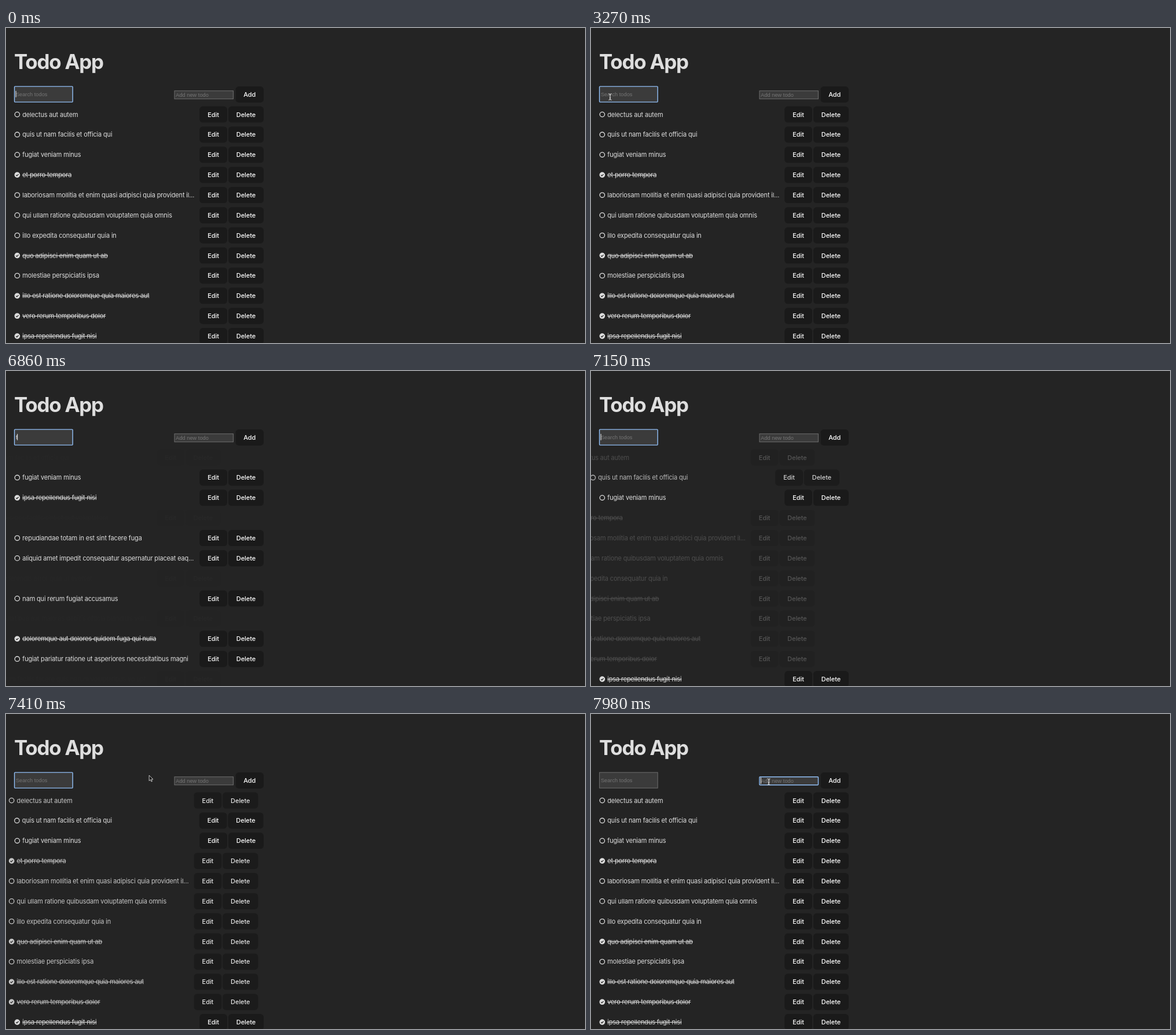
Animation of 1000 by 545 pixels, one loop 8000 ms. Source, as an HTML page:

```html
<!DOCTYPE html>
<html lang="en">
<head>
<meta charset="utf-8">
<title>Todo App</title>
<style>
html, body { margin: 0; width: 100%; height: 100%; overflow: hidden; background: #242424; }
svg { display: block; width: 100vw; height: 100vh; }
text { font-family: Inter, sans-serif; font-size: 11px; fill: #dedede; }
.title { font-size: 35px; font-weight: 700; letter-spacing: -1.3px; }
.item { letter-spacing: -.17px; }
.done { text-decoration: line-through; }
.label { font-weight: 500; letter-spacing: -.05px; text-anchor: middle; fill: #fff; }
.button { fill: #1a1a1a; }
.field { fill: #3b3b3b; }
.input { font-family: "Liberation Sans", Arial, sans-serif; font-size: 9.25px; }
.hint { fill: #757575; }
</style>
</head>
<body>
<svg id="stage" viewBox="0 0 1000 545"></svg>
<script>
const LOOP = 8000, ROWS = 12, PITCH = 34.86, ENTER = 630, SLIDE = 75;

// "+" marks a finished todo, "|" is where the title is cut off
const todos = `delectus aut autem
quis ut nam facilis et officia qui
fugiat veniam minus
+et porro tempora
laboriosam mollitia et enim quasi adipisci quia provident il|lum
qui ullam ratione quibusdam voluptatem quia omnis
illo expedita consequatur quia in
+quo adipisci enim quam ut ab
molestiae perspiciatis ipsa
+illo est ratione doloremque quia maiores aut
+vero rerum temporibus dolor
+ipsa repellendus fugit nisi
+accusamus eos facilis sint et aut voluptatem
repudiandae totam in est sint facere fuga
aliquid amet impedit consequatur aspernatur placeat eaq|ue fugiat suscipit
rerum perferendis error quia ut eveniet
nam qui rerum fugiat accusamus
ut necessitatibus aut maiores debitis officia blanditiis velit| et
+doloremque aut dolores quidem fuga qui nulla
fugiat pariatur ratione ut asperiores necessitatibus magni
praesentium facilis facere quis harum voluptatibus volupt|atem eum
+fugiat perferendis sed aut quidem
quia modi consequatur vero fugiat
consequatur rerum amet fuga expedita sunt
+fugit est minima dolor
quis impedit fuga et tempore`.split("\n").map(line => {
  const text = line.replace("+", "");
  const [shown, rest] = text.split("|");
  return { done: line[0] === "+", full: text.replace("|", ""), shown: rest ? shown + "..." : shown };
});

const queries = [[0, ""], [4730, "f"], [5230, "fug"], [6660, "fu"], [6846, "f"], [7046, ""]];
const caretOff = [[360, 860], [1360, 2010], [2510, 2920], [3270, 3770], [4270, 4730], [5710, 6210], [7400, 7900]];
const FOCUS_ADD = 7900;

// pointer hot spot: time, x, y
const paths = [
  [[360, 655, 235], [480, 440, 170], [690, 440, 170], [1460, 120, 92], [1570, 120, 92],
   [1740, 80, 112], [2210, 80, 112], [2690, 33, 119], [4730, 33, 119]],
  [[7290, 33, 119], [7410, 247, 106], [7610, 285, 112], [7710, 285, 112], [7860, 307, 117], [8000, 307, 117]]
];

const stage = document.getElementById("stage");
function add(parent, tag, attrs = {}, text) {
  const el = document.createElementNS("http://www.w3.org/2000/svg", tag);
  set(el, attrs);
  if (text) el.textContent = text;
  return parent.appendChild(el);
}
function set(el, attrs) {
  for (const key in attrs) el.setAttribute(key, attrs[key]);
}
const show = (el, on) => set(el, { visibility: on ? "visible" : "hidden" });

function button(parent, x, y, width, text) {
  add(parent, "rect", { class: "button", x, y: y - 14, width, height: 28, rx: 5.6 });
  add(parent, "text", { class: "label", x: x + width / 2, y: y + 4 }, text);
}

function input(x, y, width, height, hint) {
  const box = add(stage, "rect", { class: "field", x, y, width, height });
  const base = y + height / 2 + 3.2;
  const text = add(stage, "text", { class: "input", x: x + 2.3, y: base });
  const caret = add(stage, "rect", { y: base - 9, width: 1, height: 11, fill: "#f0f0f0" });
  return (value, focused, caretOn) => {
    set(box, { rx: focused ? 1 : 0, stroke: focused ? "#92c0f8" : "#6e6e6e", "stroke-width": focused ? 1.4 : 1 });
    text.textContent = value || hint;
    set(text, { class: value ? "input" : "input hint" });
    set(caret, { x: x + 2 + (value ? text.getComputedTextLength() : 0) });
    show(caret, focused && caretOn);
  };
}

add(stage, "text", { class: "title", x: 14, y: 71 }, "Todo App");
const search = input(14.6, 101.1, 100.6, 27, "Search todos");
const addField = input(291, 108.7, 101.5, 14, "Add new todo");
button(stage, 396.5, 115, 48.5, "Add");

const rows = Array.from({ length: ROWS }, (_, i) => {
  const y = 149.6 + i * PITCH;
  const g = add(stage, "g");
  const ring = add(g, "circle", { cx: 19.4, cy: y, r: 4.2, stroke: "#dedede", "stroke-width": 1.3 });
  const tick = add(g, "path", { d: `M17.3 ${y + .1}l1.5 1.6 2.8-3`, fill: "none", stroke: "#242424", "stroke-width": 1.2 });
  const text = add(g, "text", { x: 28.3, y: y + 4 });
  button(g, 334.3, y, 47.7, "Edit");
  button(g, 384, y, 61, "Delete");
  return { g, ring, tick, text };
});

const arrow = add(stage, "path", {
  d: "M0 0V9.6L2.3 7.5 3.8 11 5.3 10.3 3.8 7H6.8Z", fill: "#111", stroke: "#eee", "stroke-width": .8
});
const beam = add(stage, "path", {
  d: "M-2.5-5Q0-5 0-3.5Q0-5 2.5-5M0-3.5V4M-2.5 5.5Q0 5.5 0 4Q0 5.5 2.5 5.5M-1.2 2H1.2", fill: "none", stroke: "#eee", "stroke-width": 1
});

// cubic-bezier(.25, .1, .25, 1)
function ease(x) {
  if (x <= 0) return 0;
  if (x >= 1) return 1;
  const curve = (a, b, s) => 3 * a * s * (1 - s) ** 2 + 3 * b * s * s * (1 - s) + s ** 3;
  let lo = 0, hi = 1;
  for (let i = 0; i < 24; i++) {
    const mid = (lo + hi) / 2;
    if (curve(.25, .25, mid) < x) lo = mid; else hi = mid;
  }
  return curve(.1, 1, lo);
}

function pointer(t) {
  const path = paths.find(p => t >= p[0][0] && t < p.at(-1)[0]);
  if (!path) return null;
  const i = path.findIndex(p => p[0] > t);
  const [t0, x0, y0] = path[i - 1], [t1, x1, y1] = path[i];
  const k = (t - t0) / (t1 - t0);
  return [x0 + (x1 - x0) * k, y0 + (y1 - y0) * k];
}

const inside = ([x, y], left, top, right, bottom) => x > left && x < right && y > top && y < bottom;

// a todo slides in when a shorter query brings it back
function enterTime(todo, step) {
  for (let i = step; i > 0; i--) {
    if (!todo.full.includes(queries[i - 1][1])) return queries[i][0];
  }
  return -ENTER;
}

function draw(t) {
  const step = queries.findLastIndex(q => q[0] <= t);
  const query = queries[step][1];
  const found = todos.filter(todo => todo.full.includes(query));
  rows.forEach(({ g, ring, tick, text }, i) => {
    const todo = found[i];
    const p = ease((t - enterTime(todo, step)) / ENTER);
    set(g, { opacity: p, transform: `translate(${SLIDE * (p - 1)} 0)` });
    set(ring, { fill: todo.done ? "#dedede" : "none" });
    show(tick, todo.done);
    text.textContent = todo.shown;
    set(text, { class: todo.done ? "item done" : "item" });
  });

  const caretOn = !caretOff.some(([from, to]) => t >= from && t < to);
  search(query, t < FOCUS_ADD, caretOn);
  addField("", t >= FOCUS_ADD, caretOn);

  const at = pointer(t);
  const typing = at && (inside(at, 14, 101, 116, 128) || inside(at, 290, 108, 393, 123));
  show(arrow, at && !typing);
  show(beam, typing);
  if (at) for (const el of [arrow, beam]) set(el, { transform: `translate(${at})` });
}

function frame(now) {
  draw(now % LOOP);
  requestAnimationFrame(frame);
}
draw(0);
requestAnimationFrame(frame);
</script>
</body>
</html>
```
